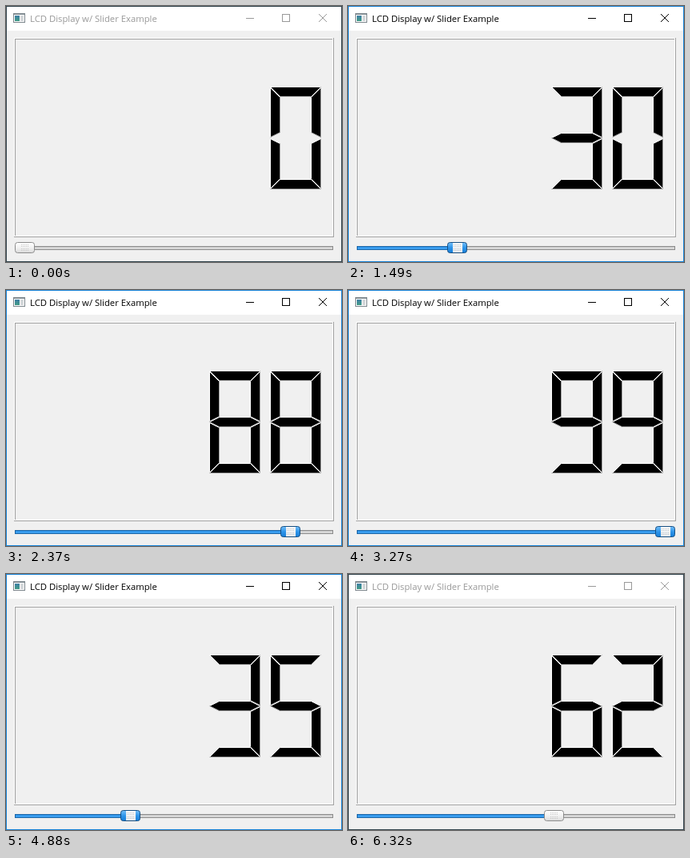
Write an HTML page with a canvas that moves like this. It is 420 px wide and 321 px high and loops after 6.45 s.

```html
<!DOCTYPE html>
<html lang="en">
<head>
<meta charset="utf-8">
<title>LCD Display w/ Slider Example</title>
<style>
  html, body { margin: 0; width: 100%; height: 100%; overflow: hidden; background: #f0f0f0; }
  canvas { display: block; width: 420px; height: 321px; }
</style>
</head>
<body>
<canvas id="stage" width="420" height="321"></canvas>
<script>
const ctx = document.getElementById('stage').getContext('2d');
const LOOP = 6450, HOVER = 200, ACTIVE = 350, INACTIVE = 6320;

// Slider drags: first point [time, value], then [time, value, steps, bend]
const DRAGS = [
  [[660, 1], [1290, 17, 14, -.6], [1490, 30, 8, -.1], [1920, 64, 17, 0],
   [1940, 65, 1, 0], [1970, 67, 1, 0], [2530, 93, 15, .6]],
  [[3100, 94], [3270, 99, 5, 0]],
  [[3560, 98], [4010, 49, 17, 0], [4190, 40, 6, .5]],
  [[4290, 39], [4490, 34, 5, 0]],
  [[4880, 35], [5300, 57, 14, .1]],
  [[5450, 58], [5600, 62, 4, 0]]
];

function valueAt(t) {
  let value = 0;
  for (const drag of DRAGS) {
    if (t < drag[0][0]) break;
    value = drag[0][1];
    for (let i = 1; i < drag.length; i++) {
      const [t0, v0] = drag[i - 1];
      const [t1, v1, steps, bend] = drag[i];
      if (t >= t1) { value = v1; continue; }
      const u = Math.floor((t - t0) / (t1 - t0) * steps + 1e-6) / steps;
      value = Math.round(v0 + (v1 - v0) * (u + bend * u * (1 - u)));
      break;
    }
  }
  return value;
}

function rect(x, y, w, h, fill) {
  ctx.fillStyle = fill;
  ctx.fillRect(x, y, w, h);
}

function frame(x, y, w, h, color) {
  ctx.strokeStyle = color;
  ctx.lineWidth = 1;
  ctx.strokeRect(x + .5, y + .5, w - 1, h - 1);
}

function line(x0, y0, x1, y1, color) {
  ctx.strokeStyle = color;
  ctx.lineWidth = 1;
  ctx.beginPath();
  ctx.moveTo(x0, y0);
  ctx.lineTo(x1, y1);
  ctx.stroke();
}

function gradient(y0, y1, ...colors) {
  const g = ctx.createLinearGradient(0, y0, 0, y1);
  colors.forEach((c, i) => g.addColorStop(i / (colors.length - 1), c));
  return g;
}

// Seven segments: corner points, and per edge L (light) or D (dark)
const S = 64, W = 12, H = W / 2, E = S - 1;
const SEGMENTS = [
  ['LDDL', [0, 0], [E, 0], [E - W, W], [W, W]],
  ['LDDL', [0, 1], [W, W + 1], [W, S - H - 1], [0, S - 1]],
  ['DDLL', [E, 1], [E, S - 1], [E - W, S - H - 1], [E - W, W + 1]],
  ['LLLDDD', [0, S], [W, S - H], [E - W, S - H], [E, S], [E - W, S + H], [W, S + H]],
  ['LDDL', [0, S + 1], [W, S + 1 + H], [W, 2 * S - W - 1], [0, 2 * S - 1]],
  ['DDLL', [E, S + 1], [E, 2 * S - 1], [E - W, 2 * S - W - 1], [E - W, S + 1 + H]],
  ['LLLD', [0, 2 * S], [W, 2 * S - W], [E - W, 2 * S - W], [E, 2 * S]]
];
const DIGITS = ['012456', '25', '02346', '02356', '1235', '01356', '013456', '025', '0123456', '012356'];

function drawDigit(digit, x, y) {
  ctx.save();
  ctx.translate(x + .5, y + .5);
  for (const id of DIGITS[digit]) {
    const [edges, ...pts] = SEGMENTS[id];
    ctx.beginPath();
    pts.forEach(p => ctx.lineTo(...p));
    ctx.closePath();
    ctx.fillStyle = '#000';
    ctx.fill();
    pts.forEach((p, i) => {
      const q = pts[(i + 1) % pts.length];
      line(...p, ...q, edges[i] === 'L' ? '#fff' : '#a0a0a0');
    });
  }
  ctx.restore();
}

function drawLcd(value) {
  // raised box: light and dark rectangles one pixel apart
  rect(10, 40, 400, 1, '#fff');
  rect(10, 40, 1, 250, '#fff');
  rect(408, 41, 1, 248, '#fff');
  rect(11, 288, 398, 1, '#fff');
  rect(11, 41, 397, 1, '#a0a0a0');
  rect(11, 41, 1, 247, '#a0a0a0');
  rect(409, 40, 1, 250, '#a0a0a0');
  rect(10, 289, 400, 1, '#a0a0a0');
  [...String(value)].reverse().forEach((d, i) => drawDigit(+d, 330 - 76 * i, 101));
}

function drawHandle(x, hot) {
  ctx.beginPath();
  ctx.roundRect(x + .5, 296.5, 24, 13, 3);
  ctx.fillStyle = hot ? gradient(297, 309, '#6fbcf8', '#2f95ea', '#1a80d8')
                      : gradient(297, 309, '#ffffff', '#f2f2f2', '#dcdcdc');
  ctx.fill();
  ctx.strokeStyle = hot ? '#174f82' : '#8c8c8c';
  ctx.lineWidth = 1;
  ctx.stroke();
  if (hot) rect(x + 7, 297, 12, 12, gradient(297, 309, '#fbfbfb', '#e4e8ec'));
  for (let i = 0; i < 5; i++)
    for (let j = 0; j < 4; j++)
      rect(x + 8 + 2 * i, 299 + 2 * j + (j > 1), 1, 1, hot ? '#c3c8cd' : '#c8c8c8');
}

function drawSlider(value, hot, tear) {
  const x = 11 + Math.round(value * 373 / 99);
  rect(11, 301, 398, 5, gradient(301, 306, '#c8c8c8', '#e2e2e2'));
  frame(11, 301, 398, 5, '#8a8a8a');
  if (value) {
    const w = x - 11 + 4;
    rect(11, 301, w, 5, gradient(301, 306, '#2a8fe6', '#48a9f5'));
    frame(11, 301, w, 5, '#1c65a5');
  }
  drawHandle(x, hot);
  if (tear) {
    ctx.save();
    ctx.beginPath();
    ctx.rect(12, 307, 23, 2);
    ctx.clip();
    drawHandle(x, true);
    ctx.restore();
  }
}

function drawWindow(active) {
  const ink = active ? '#000' : '#999';
  rect(0, 0, 420, 321, '#f0f0f0');
  rect(0, 0, 420, 31, '#fff');
  frame(0, 0, 420, 321, active ? '#1883d7' : '#34464f');

  // window icon
  rect(9, 9, 15, 12, '#fff');
  rect(11, 12, 6, 7, gradient(12, 19, '#3f7fa6', '#3f9a83'));
  rect(18, 12, 4, 7, '#d4d8da');
  rect(9, 9, 15, 2, '#8b959b');
  frame(9, 9, 15, 12, '#7c868c');

  ctx.font = '11.3px "Open Sans", "Noto Sans", sans-serif';
  ctx.textBaseline = 'alphabetic';
  ctx.fillStyle = ink;
  ctx.fillText('LCD Display w/ Slider Example', 30, 20);

  rect(300, 15, 10, 1, ink);
  frame(345, 10, 10, 10, ink);
  line(391, 10, 401, 20, ink);
  line(401, 10, 391, 20, ink);
}

function draw(t) {
  const active = t >= ACTIVE && t < INACTIVE;
  const value = valueAt(t);
  drawWindow(active);
  drawLcd(value);
  drawSlider(value, active, t >= HOVER && t < ACTIVE);
}

const start = performance.now();
function tick() {
  draw((performance.now() - start) % LOOP);
  requestAnimationFrame(tick);
}
tick();
</script>
</body>
</html>
```
